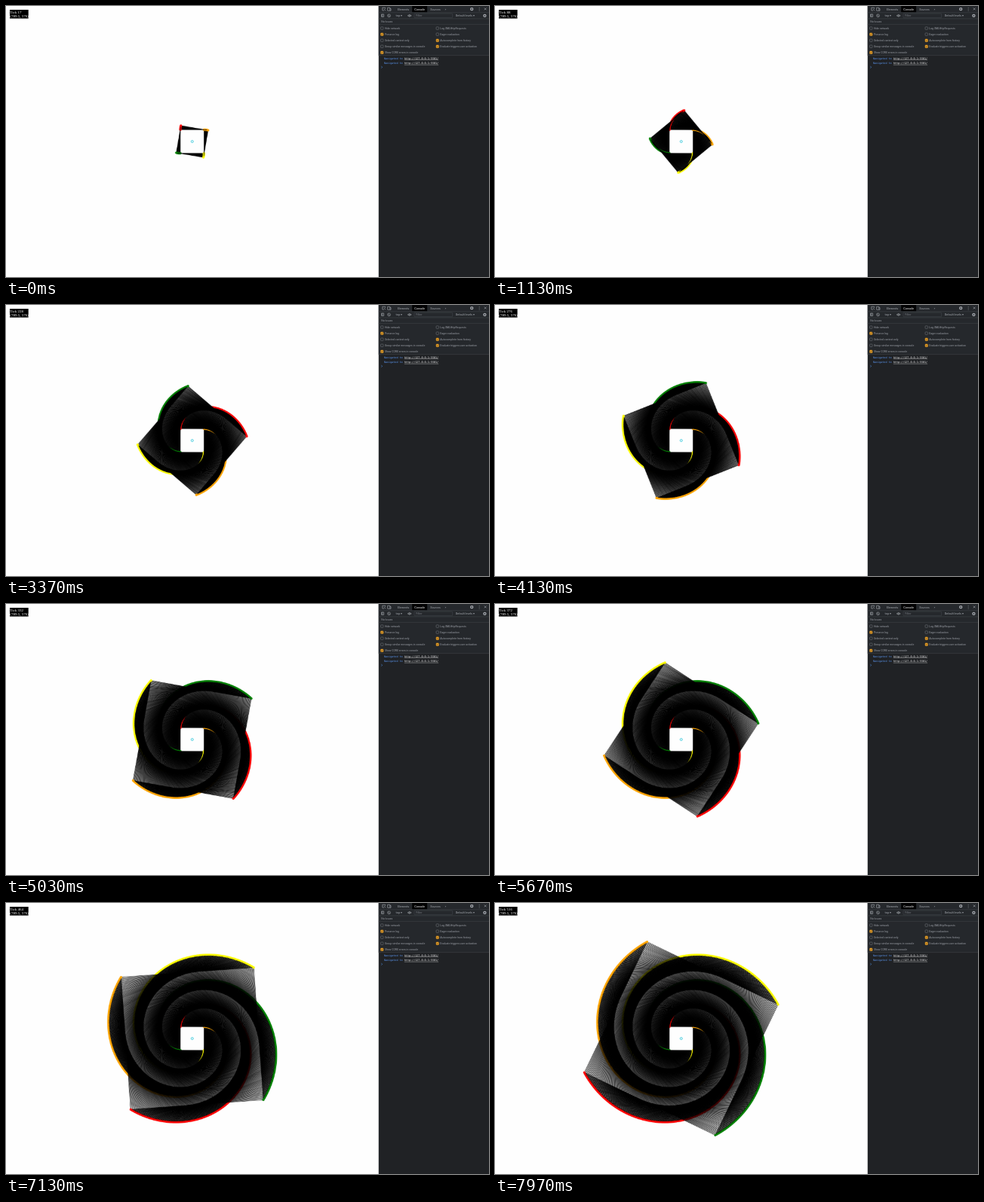
Write an HTML page with a canvas that moves like this. It is 640 px wide and 360 px high and loops after 8000 ms.

```html
<!DOCTYPE html>
<html lang="en">
<head>
<meta charset="utf-8">
<title>Spinning square</title>
<style>
  html, body { margin: 0; width: 100%; height: 100%; overflow: hidden; background: #fefefe; }
  canvas, svg { position: absolute; left: 0; top: 0; width: 640px; height: 360px; display: block; }
  text { white-space: pre; }
  .ui { font: 12px Roboto, "Open Sans", sans-serif; fill: #a9adb3; }
  .small { font-size: 11px; fill: #9a9ea5; }
  .active { fill: #fff; }
  .hint { fill: #777b82; }
  .mono { font: 11px "DejaVu Sans Mono", monospace; }
  .label { font: 16px "Liberation Serif", serif; fill: #fff; }
  .icon { fill: none; stroke: #a4a8ae; stroke-width: 2; }
  .rule { stroke: #3d4146; stroke-width: 2; }
</style>
</head>
<body>
<canvas id="stage" width="640" height="360"></canvas>
<svg viewBox="0 0 2048 1152">
  <circle cx="789.5" cy="576" r="5" fill="#d9f6fa" stroke="#62d3e2" stroke-width="3"/>
  <rect x="16" y="16" width="79" height="37"/>
  <text class="label" id="tick" x="17" y="31"></text>
  <text class="label" x="17" y="49">(789.5, 576)</text>

  <rect x="1580" width="468" height="1152" fill="#202225"/>
  <rect x="1580" width="468" height="210" fill="#25282c"/>
  <rect x="1722" width="64" height="27" fill="#020203"/>
  <path class="rule" d="M1580 28h468M1580 54h468M1580 78h468M1580 210h468"/>

  <g class="ui">
    <text x="1660" y="18">Elements</text>
    <text x="1732" y="18" class="active">Console</text>
    <text x="1799" y="18">Sources</text>
    <text x="1861" y="18">»</text>
    <text x="1653" y="45">top ▾</text>
    <text x="1738" y="45" class="hint">Filter</text>
    <text x="1906" y="45">Default levels ▾</text>
    <text x="1591" y="71" class="small">No Issues</text>
  </g>
  <g class="icon">
    <path d="M1604 19h-8v-12h12v5M1602 12l8 8M1618 7h10v13h-10zM1628 11h4v9h-4"/>
    <path d="M1592 35h10v11h-10zM1596 35v11M1620 37l7 8"/>
    <circle cx="1624" cy="41" r="6"/>
    <path d="M1703 41q8-9 16 0q-8 9-16 0z"/>
    <circle cx="1711" cy="41" r="2"/>
    <circle cx="1975" cy="13" r="5" stroke-width="4"/>
    <circle cx="2030" cy="41" r="5" stroke-width="4"/>
    <path d="M2007 6v3M2007 12v3M2007 18v3M2028 8l9 9M2037 8l-9 9"/>
    <rect x="1731" y="32" width="162" height="18" rx="2" stroke="#4a4e54" stroke-width="1.5"/>
    <path d="M1591 256l5 4l-5 4" stroke="#4a80c8"/>
  </g>
  <g id="options"></g>
  <g id="log"></g>
</svg>
<script>
const LOOP = 8000, WIDTH = 2048, HEIGHT = 1152;
const BACKGROUND = '#fefefe';
const CENTER = [789.5, 576];
const CORNERS = [[-1, -1, 'red'], [1, -1, 'orange'], [1, 1, 'yellow'], [-1, 1, 'green']];

const svg = (parent, name, attrs, text = '') => {
  const node = document.createElementNS('http://www.w3.org/2000/svg', name);
  for (const key in attrs) node.setAttribute(key, attrs[key]);
  node.textContent = text;
  parent.append(node);
};

function addOptions(x, items) {
  const group = document.getElementById('options');
  items.forEach(([text, checked], row) => {
    const y = 94 + row * 25.8;
    svg(group, 'rect', {
      x: x - 5, y: y - 5, width: 11, height: 11, rx: 2,
      fill: checked ? '#f5a623' : 'none', stroke: checked ? '#f5a623' : '#7d8187', 'stroke-width': 1.5
    });
    if (checked) svg(group, 'path', { d: `M${x - 3} ${y}l3 3l4-6`, fill: 'none', stroke: '#25282c', 'stroke-width': 2 });
    svg(group, 'text', { class: 'ui small', x: x + 12, y: y + 4 }, text);
  });
}

addOptions(1594, [['Hide network'], ['Preserve log', 1], ['Selected context only'],
  ['Group similar messages in console'], ['Show CORS errors in console', 1]]);
addOptions(1829, [['Log XMLHttpRequests'], ['Eager evaluation'],
  ['Autocomplete from history', 1], ['Evaluate triggers user activation', 1]]);

const log = document.getElementById('log');
for (const y of [226, 246]) {
  svg(log, 'text', { class: 'mono', x: 1603, y, fill: '#5b95ee' }, 'Navigated to');
  svg(log, 'text', { class: 'mono', x: 1689, y, fill: '#f4f4f4', 'text-decoration': 'underline' }, 'http://127.0.0.1:5501/');
}

const view = document.getElementById('stage').getContext('2d');
const trail = Object.assign(document.createElement('canvas'), { width: WIDTH, height: HEIGHT }).getContext('2d');
const label = document.getElementById('tick');
view.imageSmoothingQuality = 'high';
trail.lineWidth = 1.5;
let drawn = -1;

function drawSquare(tick) {
  const half = 50 + tick / 2;
  trail.save();
  trail.translate(...CENTER);
  trail.rotate(tick * 0.01);
  trail.strokeRect(-half, -half, half * 2, half * 2);
  for (const [sx, sy, color] of CORNERS) {
    trail.fillStyle = color;
    trail.beginPath();
    trail.arc(sx * half, sy * half, 5, 0, Math.PI * 2);
    trail.fill();
  }
  trail.restore();
}

function render(now) {
  const tick = Math.floor(17.6 + (now % LOOP) * 0.0626);
  if (tick !== drawn) {
    // The trail only accumulates, so restart it when time wraps around.
    if (tick < drawn || drawn < 0) {
      trail.fillStyle = BACKGROUND;
      trail.fillRect(0, 0, WIDTH, HEIGHT);
      drawn = -1;
    }
    while (drawn < tick) drawSquare(++drawn);
    view.drawImage(trail.canvas, 0, 0, 640, 360);
    label.textContent = 'Tick ' + tick;
  }
}

const start = performance.now();
function loop() {
  render(performance.now() - start);
  requestAnimationFrame(loop);
}
loop();
</script>
</body>
</html>
```
